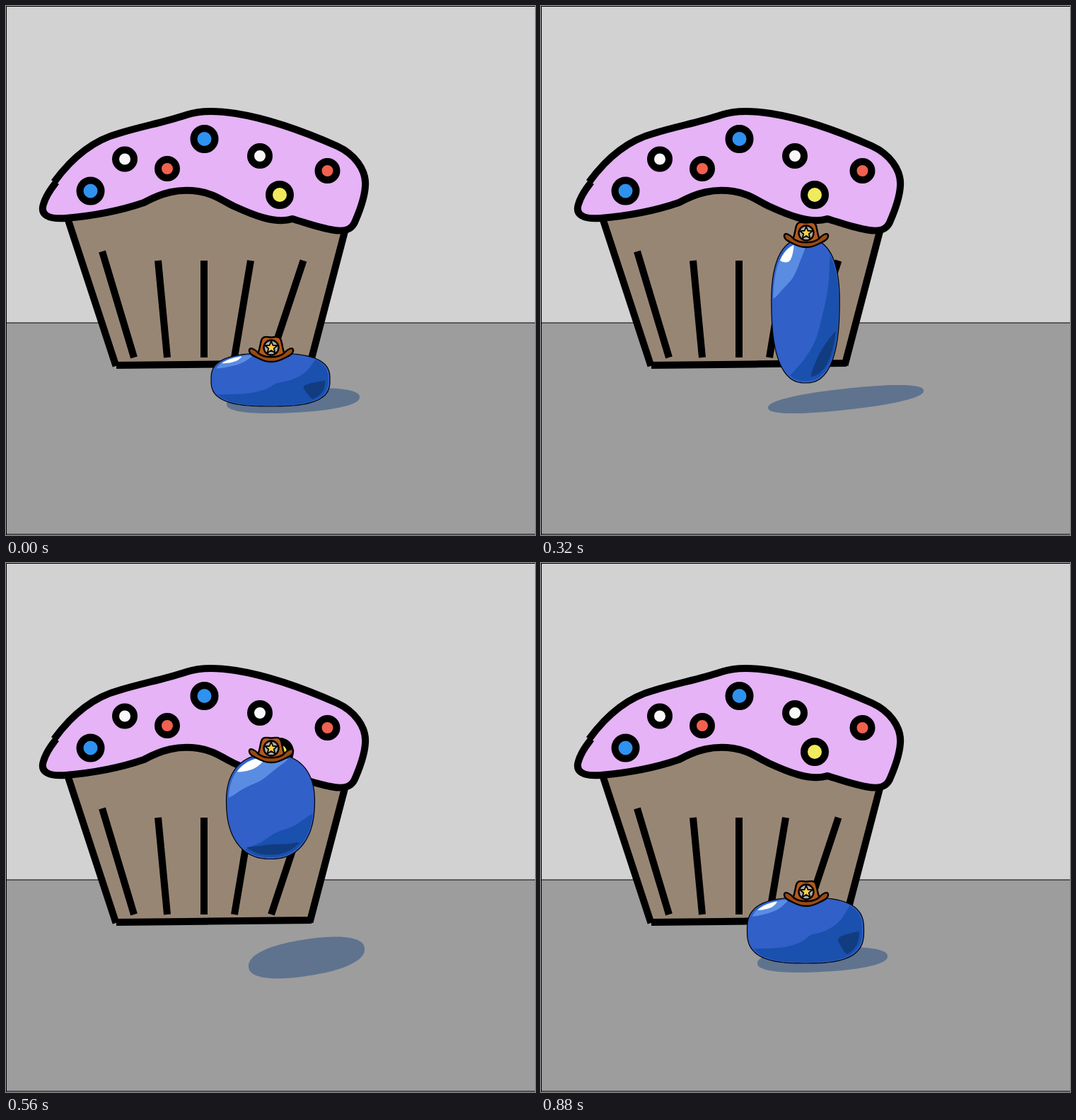
An HTML page for the animation above (960 ms loop, 748 by 748 pixels).

```html
<!DOCTYPE html>
<html lang="en">
<head>
<meta charset="utf-8">
<title>Bouncing blueberry</title>
<style>
  html, body { margin: 0; width: 100%; height: 100%; overflow: hidden; background: #9d9d9d; }
  svg { display: block; width: 100vw; height: 100vh; }
</style>
</head>
<body>
<svg viewBox="0 0 748 748" xmlns="http://www.w3.org/2000/svg">
  <rect width="748" height="448" fill="#d2d2d2"/>
  <rect y="448" width="748" height="300" fill="#9d9d9d"/>
  <path d="M0 448H748M0 .5H748M.5 0V748M0 747H748" stroke="#000" fill="none"/>

  <g stroke="#000" stroke-width="10" fill="none">
    <path d="M87 300L155 508L430 505L480 315L260 255Z" fill="#988675" stroke="none"/>
    <path d="M87 300L155.500 509M156 508L432 505M429.500 508L480 315"/>
    <path d="M136 347L181 497M215 360L228 497M280 360V497M346 360L323 497M420.500 360L375 497"/>
    <path fill="#e5b3f6" stroke-linejoin="round" d="M68 249C92 216 122 190 160 180C192 170 222 165 255 154
      C275 147 300 148 325 152C375 160 425 179 468 198C492 209 510 231 508 255C507 272 500 290 493 306
      C488 317 478 319 464 317C443 314 425 307 405 301C380 309 346 294 322 283C304 274 293 265 272 262
      C243 258 221 264 195 278C160 290 120 297 85 300C59 302 48 295 53 280C56 270 63 259 71 249"/>
    <g id="dots"></g>
  </g>

  <path id="shadow" fill="#5f738f"/>
  <path id="body" fill="#3060c8" stroke="#000" stroke-width="1.2"/>
  <path id="light" fill="#5a8de2"/>
  <path id="shade" fill="#1a50ae"/>
  <path id="deep" fill="#113c80"/>
  <path id="glint" fill="#fff"/>

  <g id="hat" stroke="#000" stroke-width="2.4" stroke-linejoin="round">
    <path fill="#b4591a" d="M-20 27C-16 20 -16 12 -14 6C-12 -1 -6 1 0 1.500C6 1 12 -1 14 6C16 12 16 20 20 27Q0 34 -20 27Z"/>
    <path fill="#9a4a12" d="M-31 19C-30 15 -23 18 -18 24C-10 31 10 31 18 24C23 18 30 15 31 19
      C32 26 22 29 14 33C6 37 -6 37 -14 33C-22 29 -32 26 -31 19Z"/>
    <circle cy="16" r="10.500" fill="#aaa"/>
    <path id="star" fill="#f8d048" stroke-width="1.8"/>
  </g>
</svg>
<script>
const $ = id => document.getElementById(id);
const STEP = 80, CENTER = 374, FLOOR = 566;

// Roundness of the berry, and its markings as bands along the rim:
// first angle, last angle (degrees, clockwise from the right), inner depth.
const squat = { power: 2.8, light: [205, 252, .72], glint: [217, 241, .83], shade: [148, -45, .15], deep: [2, 46, .58] };
const tall = { power: 2.5, light: [190, 272, .55], glint: [224, 250, .78], shade: [118, -48, .45], deep: [18, 80, .68] };
const round = { power: 2.35, light: [190, 293, .52], glint: [222, 264, .78], shade: [126, 8, .5], deep: [126, 45, .72] };
const outer = { light: .95, glint: .94, shade: .97, deep: .92 };

// Berry top, bottom and half width; shadow centre and half size.
const pose = (look, top, bottom, half, ...shadow) => ({ ...look, box: [top, bottom, half], shadow });
const poses = [
  pose(squat, 491, 566, 84, 406, 558, 94, 17),
  pose(tall, 447, 566, 64.5, 410, 564, 87, 21),
  pose(tall, 329, 533, 48, 431, 556, 110, 15),
  pose(round, 268, 418, 59, 424, 552, 82, 20),
  pose(round, 270, 418.5, 62.3, 425, 558, 82, 26),
  pose(tall, 403, 566, 51.5, 471, 573, 94, 15),
  pose(squat, 473, 566, 82.5, 398, 561, 92, 17)
];
const timeline = [0, .5, 1, 1.5, 2, 3, 3.5, 4, 4.4, 5, 5.5, 6];
const APEX = 3;

const mix = (a, b, t) => a + (b - a) * t;
const blend = (a, b, t) => Array.isArray(a) ? a.map((v, i) => mix(v, b[i], t)) : mix(a, b, t);
const loop = points => 'M' + points.map(p => p.map(v => v.toFixed(2))).join('L') + 'Z';

// Point on a unit superellipse.
function rim(deg, power, reach = 1) {
  const a = deg * Math.PI / 180, c = Math.cos(a), s = Math.sin(a);
  const r = reach / (Math.abs(c) ** power + Math.abs(s) ** power) ** (1 / power);
  return [c * r, s * r];
}

const circuit = power => Array.from({ length: 90 }, (_, i) => rim(i * 4, power));

// Crescent that follows the rim and swells inwards.
function band([from, to, inner], edge, power) {
  const n = 24, out = [], back = [];
  for (let i = 0; i <= n; i++) {
    const deg = mix(from, to, i / n);
    const swell = Math.max(0, Math.sin(Math.PI * i / n)) ** .7;
    out.push(rim(deg, power, edge));
    back.unshift(rim(deg, power, mix(edge, inner, swell)));
  }
  return out.concat(back);
}

function draw(ms) {
  const at = timeline[Math.floor(ms / STEP) % timeline.length];
  const i = Math.floor(at), t = at - i;
  const a = poses[i], b = poses[i + 1] || a;
  const get = key => blend(a[key], b[key], t);

  const [top, bottom, half] = get('box'), power = get('power');
  const lift = i === APEX ? 96 * t * (1 - t) : 0;
  const mid = (top + bottom) / 2 - lift, tallness = (bottom - top) / 2;
  const air = Math.min(1, (FLOOR - bottom) / 33);
  const place = ([u, v]) => [CENTER + u * half * (1 - .05 * air * v), mid + v * tallness];

  $('body').setAttribute('d', loop(circuit(power).map(place)));
  for (const id in outer) $(id).setAttribute('d', loop(band(get(id), outer[id], power).map(place)));

  const [x, y, rx, ry] = get('shadow'), tilt = 5 + 7 * air;
  $('shadow').setAttribute('d', loop(circuit(2.3).map(([u, v]) => [x + u * rx, y + v * ry - u * tilt])));
  $('hat').setAttribute('transform', `translate(${CENTER + 1} ${top - lift - 24})`);
}

const blue = '#2f92f0', white = '#f8f8f8', red = '#f0614f', yellow = '#f0eb5c';
$('dots').innerHTML = [
  [119.5, 261.5, 15, blue], [168, 216.5, 13, white], [228, 230, 13, red], [280.5, 188, 15, blue],
  [359, 212, 13, white], [454.5, 233, 13, red], [387, 267, 15, yellow]
].map(([x, y, r, fill]) => `<circle cx="${x}" cy="${y}" r="${r}" fill="${fill}"/>`).join('');

$('star').setAttribute('d', loop(Array.from({ length: 10 }, (_, i) => {
  const a = i * Math.PI / 5, r = i % 2 ? 4 : 9.2;
  return [Math.sin(a) * r, 16 - Math.cos(a) * r];
})));

const start = performance.now();
function tick() {
  draw(performance.now() - start);
  requestAnimationFrame(tick);
}
tick();
</script>
</body>
</html>
```
